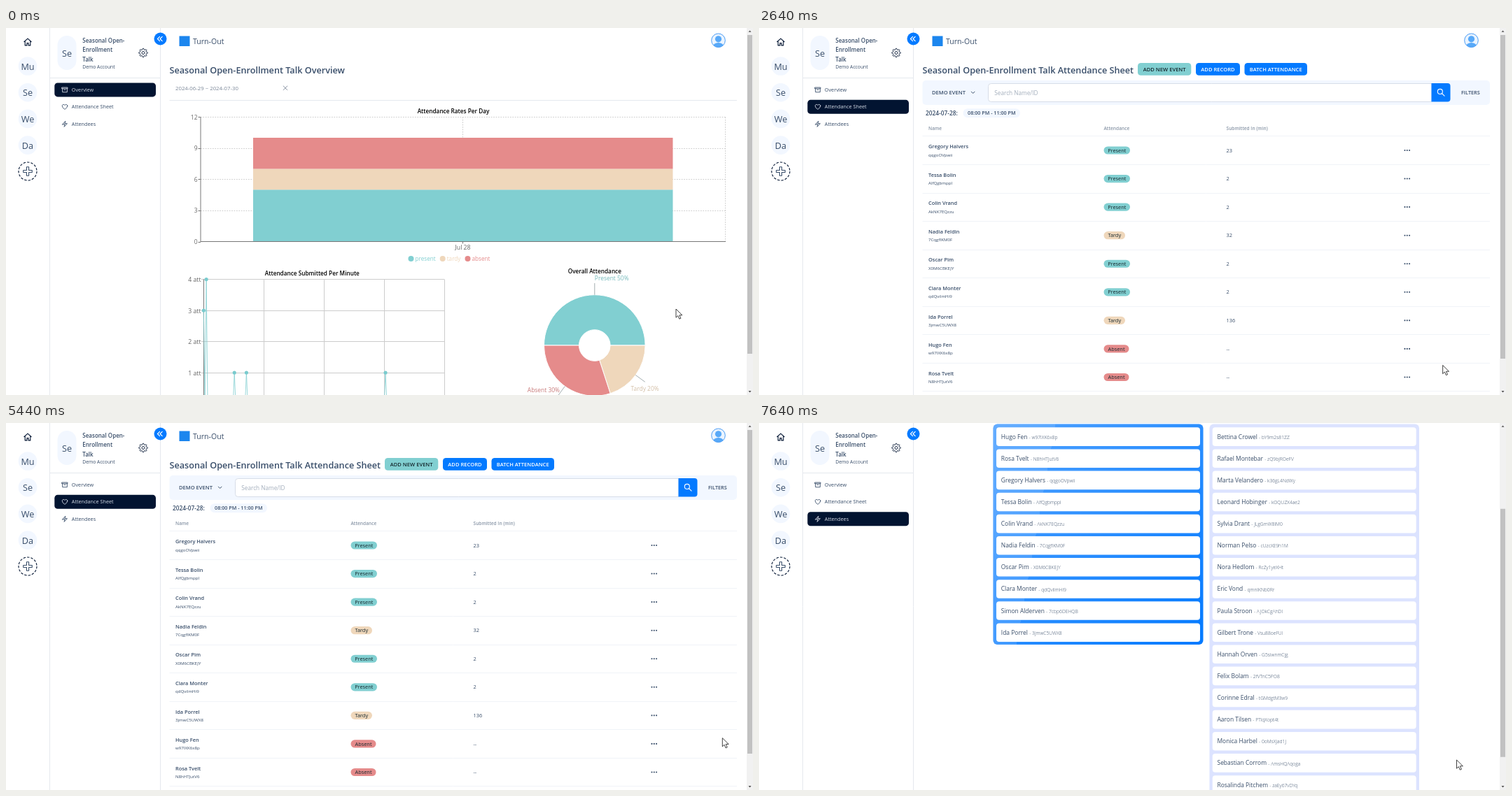
Animation, 1067 px wide and 525 px high, one loop 8 s. Source, as an HTML page with a canvas:

```html
<!DOCTYPE html>
<html lang="en">
<head>
<meta charset="utf-8">
<title>Attendance dashboard</title>
<style>
html, body { margin: 0; width: 100%; height: 100%; overflow: hidden; background: #fff; }
canvas { display: block; }
</style>
</head>
<body>
<canvas id="stage" width="1067" height="525"></canvas>
<script>
const ctx = document.getElementById('stage').getContext('2d');
const LOOP = 8000;
const BLUE = '#047aff', TEAL = '#81cfd1', SAND = '#efd7bb', RED = '#e58b8b';
const INK = '#394e6a', NAVY = '#021431', PALE = '#f2f7ff', LINE = '#e5e8ee', DARK = '#16282e';
const TITLE = 'Seasonal Open-Enrollment Talk';

const inside = [
  'Hugo Fen/w97IXK6x8p', 'Rosa Tvelt/N8hHTJutV6', 'Gregory Halvers/qqgoOVpwii',
  'Tessa Bolin/AlfQgbmppl', 'Colin Vrand/AkNK7EQzzu', 'Nadia Feldin/7CqgfIKM0F',
  'Oscar Pim/X0M6CBKEJY', 'Clara Monter/qdQvilmHi9', 'Simon Alderven/7cbp6DEHQB',
  'Ida Porrel/3jmwC5UWX8'].map(s => s.split('/'));
const outside = [
  'Bettina Crowel/bY9m2s81ZZ', 'Rafael Montebar/zQ9bjROeFV', 'Marta Velandero/k36gL4NdWy',
  'Leonard Hobinger/kOQUZX4ae2', 'Sylvia Drant/JLgGmW8lM0', 'Norman Pelso/cUzcXE9h1M',
  'Nora Hedlom/RcZy1yeXHt', 'Eric Vond/qmnIKNb0Rr', 'Paula Stroon/AJOkCgAhDl',
  'Gilbert Trone/Vsu88oeFUl', 'Hannah Orven/G5siwnmCjg', 'Felix Bolam/2fVTnC5PO8',
  'Corinne Edral/tGMdgtM3w9', 'Aaron Tilsen/PTlqXopt4t', 'Monica Harbel/0oMsXJad1J',
  'Sebastian Corrom/AmsHQAqoga', 'Rosalinda Pitchem/zaEy67vDYq'].map(s => s.split('/'));
// index into inside, status, minutes
const records = [[2, 'P', 23], [3, 'P', 2], [4, 'P', 2], [5, 'T', 32], [6, 'P', 2],
  [7, 'P', 2], [9, 'T', 136], [0, 'A', '--'], [1, 'A', '--'], [8, 'A', '--']];
const badges = { P: ['Present', 37.5, TEAL], T: ['Tardy', 30.5, SAND], A: ['Absent', 36, RED] };

const ICON = {
  home: 'M2.5 11.5L12 3l9.5 8.5M5 9.5V21h5v-6h4v6h5V9.5',
  box: 'M4 8v12h16V8M2.5 4h19v4h-19zM10 12h4',
  heart: 'M21 8.2c0-2.5-2.1-4.5-4.7-4.5-1.9 0-3.6 1.1-4.3 2.7-.7-1.6-2.4-2.7-4.3-2.7C5.1 3.7 3 5.7 3 8.2c0 7.3 9 12 9 12s9-4.7 9-12z',
  bolt: 'M3.8 13.5L14.2 2.2 12 10.5h8.2L9.8 21.8 12 13.5z',
  plus: 'M9.5 2h5v7.5H22v5h-7.5V22h-5v-7.5H2v-5h7.5z',
  search: 'M16 10a6.5 6.5 0 1 1-13 0a6.5 6.5 0 1 1 13 0M14.5 15L21 21.5',
  back: 'M11 4l-8 8 8 8M20 4l-8 8 8 8',
  down: 'M4 8l8 8 8-8',
  close: 'M4 4l16 16M20 4L4 20'
};

// ---- time helpers ----
const clamp = v => Math.max(0, Math.min(1, v));
const smooth = p => p * p * (3 - 2 * p);
const fade = (t, a, b) => smooth(clamp((t - a) / (b - a)));
const STEP = 65;
const ramp = (t, a, b) => t < a ? 0 : smooth(clamp((t - a + STEP) / (b - a + STEP)));

// ---- drawing helpers ----
function text(s, x, y, size, color = INK, weight = 400, align = 'left') {
  const px = size * 0.528;
  ctx.font = `${weight} ${px}px "Open Sans", "Noto Sans", sans-serif`;
  ctx.fillStyle = color;
  ctx.textAlign = align;
  ctx.fillText(s, x, y + px * 0.36);
  return ctx.measureText(s).width;
}
function box(x, y, w, h, r, fill, stroke) {
  ctx.beginPath();
  ctx.roundRect(x, y, w, h, r);
  if (fill) { ctx.fillStyle = fill; ctx.fill(); }
  if (stroke) { ctx.strokeStyle = stroke; ctx.lineWidth = 1; ctx.stroke(); }
}
function disc(x, y, r, fill) {
  ctx.beginPath();
  ctx.arc(x, y, r, 0, 7);
  ctx.fillStyle = fill;
  ctx.fill();
}
function seg(points, color, width = 1, dash = []) {
  ctx.beginPath();
  points.forEach(([x, y]) => ctx.lineTo(x, y));
  ctx.strokeStyle = color;
  ctx.lineWidth = width;
  ctx.setLineDash(dash);
  ctx.stroke();
  ctx.setLineDash([]);
}
const hline = (x1, x2, y, color = LINE, dash) => seg([[x1, y], [x2, y]], color, 1, dash);
const vline = (x, y1, y2, color = LINE, dash) => seg([[x, y1], [x, y2]], color, 1, dash);
function icon(name, cx, cy, size, color, width = 1) {
  const k = size / 24;
  ctx.save();
  ctx.translate(cx - size / 2, cy - size / 2);
  ctx.scale(k, k);
  ctx.strokeStyle = color;
  ctx.lineWidth = width / k;
  ctx.lineJoin = ctx.lineCap = 'round';
  ctx.stroke(new Path2D(ICON[name]));
  ctx.restore();
}
function button(label, x, y, w, fill, color) {
  box(x, y, w, 17.8, 4.4, fill);
  text(label, x + w / 2, y + 8.8, 14.4, color, 600, 'center');
}
const mix = (a, b, p) => `rgb(${a.map((v, i) => Math.round(v + (b[i] - v) * p))})`;

// ---- fixed side panels ----
function gear(cx, cy) {
  ctx.beginPath();
  for (let i = 0; i < 64; i++) {
    const a = i / 64 * Math.PI * 2, r = 5.4 + 0.9 * Math.tanh(3 * Math.cos(8 * a));
    ctx.lineTo(cx + r * Math.cos(a), cy + r * Math.sin(a));
  }
  ctx.closePath();
  ctx.moveTo(cx + 2, cy);
  ctx.arc(cx, cy, 2, 0, 7);
  ctx.strokeStyle = NAVY;
  ctx.lineWidth = 0.9;
  ctx.stroke();
}
function sidebar(active) {
  box(0, 0, 220, 525, 0, '#fff');
  vline(62.5, 0, 525);
  vline(220.5, 0, 525);
  icon('home', 31, 20, 13, NAVY, 1.1);
  ['Mu', 'Se', 'We', 'Da'].forEach((s, i) => {
    const y = 54.5 + 37.7 * i;
    disc(31, y, 13.3, PALE);
    text(s, 31, y + 0.5, 24, INK, 400, 'center');
  });
  ctx.beginPath();
  ctx.arc(31, 205, 13, 0, 7);
  ctx.strokeStyle = NAVY;
  ctx.lineWidth = 1.1;
  ctx.setLineDash([3.4, 2.05]);
  ctx.stroke();
  ctx.setLineDash([]);
  icon('plus', 31, 205, 15, INK, 1.1);

  box(73.5, 11, 27, 49, 13.5, PALE);
  text('Se', 87, 36.5, 24, INK, 400, 'center');
  ['Seasonal Open-', 'Enrollment', 'Talk'].forEach((s, i) => text(s, 109.3, 18 + 13.4 * i, 15.2, INK, 600));
  text('Demo Account', 109.3, 56, 12.8);
  gear(196, 35.5);
  hline(63, 220, 71.5);

  [['Overview', 'box'], ['Attendance Sheet', 'heart'], ['Attendees', 'bolt']].forEach(([label, pic], i) => {
    const y = 88.4 + 24.45 * i, p = active[i];
    ctx.globalAlpha = p;
    box(69.3, y - 10, 144.7, 20, 4.4, NAVY);
    ctx.globalAlpha = 1;
    const color = mix([57, 78, 106], [214, 219, 230], p);
    icon(pic, 84, y, 10, color, 0.9);
    text(label, 93.8, y, 13.8, color);
  });
  disc(220.5, 15.5, 9, BLUE);
  icon('back', 220, 15.5, 9.5, '#fff', 1.2);
}

// ---- pages ----
function header(right) {
  box(247.5, 11.5, 15, 14.5, 0, '#1c86ee');
  text('Turn-Out', 267, 19, 20, INK, 500);
  const x = right - 26.5, y = 17.8;
  ctx.save();
  ctx.beginPath();
  ctx.arc(x, y, 9.8, 0, 7);
  ctx.fillStyle = '#eaf4ff';
  ctx.fill();
  ctx.clip();
  disc(x, y - 2, 4.6, '#58a9f8');
  ctx.beginPath();
  ctx.ellipse(x, y + 9.5, 8, 6.3, 0, 0, 7);
  ctx.fill();
  ctx.restore();
  ctx.beginPath();
  ctx.arc(x, y, 9.8, 0, 7);
  ctx.strokeStyle = '#4a9cf5';
  ctx.lineWidth = 1;
  ctx.stroke();
}

const chartTitle = (s, x, y) => text(s, x, y, 15.6, '#000', 600, 'center');

function ratesChart() {
  chartTitle('Attendance Rates Per Day', 639, 118.8);
  const yAt = v => 305.5 - v * 14.85;
  for (let v = 3; v <= 12; v += 3) hline(278, 1028, Math.round(yAt(v)) + 0.5, '#ccc', [1.7, 1.7]);
  vline(652.5, 127.5, 305, '#ccc', [1.7, 1.7]);
  vline(1027.5, 127.5, 305, '#ccc', [1.7, 1.7]);
  [[0, 5, TEAL], [5, 7, SAND], [7, 10, RED]].forEach(([a, b, c]) =>
    box(353, yAt(b), 599.5, yAt(a) - yAt(b), 0, c));
  vline(278, 127.5, 306, '#777');
  hline(278, 1028, 305.5, '#777');
  for (let v = 0; v <= 12; v += 3) {
    hline(274.5, 278, Math.round(yAt(v)) + 0.5, '#777');
    text(v, 273.5, yAt(v) + 0.5, 16, '#666', 400, 'right');
  }
  vline(652.5, 306, 308.5, '#777');
  text('Jul 28', 652.5, 313.6, 16.5, '#666', 400, 'center');
  [['present', 578.5, TEAL], ['tardy', 623.7, SAND], ['absent', 659.5, RED]].forEach(([s, x, c]) => {
    disc(x, 330, 4, c);
    text(s, x + 6, 329.8, 15.5, c);
  });
}

function minuteChart() {
  chartTitle('Attendance Submitted Per Minute', 437.3, 351);
  const xAt = m => 282.3 + m * 1.91, yAt = v => 537.5 - v * 44.5;
  for (let i = 1; i <= 4; i++) {
    vline(Math.round(282 + 86 * i) + 0.5, 359.5, 525, '#ccc');
    hline(279, 626, Math.round(yAt(i) - 0.5) + 0.5, '#ccc');
    text(i + ' att', 278.5, yAt(i) + 0.5, 16.5, '#666', 400, 'right');
  }
  vline(282.5, 359.5, 525, '#777');
  const peaks = [[0, 3], [2, 4], [23, 1], [32, 1], [136, 1]];
  seg(peaks.flatMap(([m, v]) => [[xAt(m - 1), yAt(0)], [xAt(m), yAt(v)], [xAt(m + 1), yAt(0)]]).slice(1), TEAL, 0.8);
  peaks.forEach(([m, v]) => disc(xAt(m), yAt(v), 2.6, '#79cbce'));
}

function pieChart() {
  const x = 840.8, y = 454, R = 72.3, rad = Math.PI / 180;
  chartTitle('Overall Attendance', x, 348);
  [[180, 360, TEAL], [0, 72, SAND], [72, 180, RED]].forEach(([a, b, c]) => {
    ctx.beginPath();
    ctx.arc(x, y, R, a * rad, b * rad);
    ctx.arc(x, y, 22.3, b * rad, a * rad, true);
    ctx.closePath();
    ctx.fillStyle = c;
    ctx.fill();
    ctx.strokeStyle = '#fff';
    ctx.lineWidth = 1;
    ctx.stroke();
    const mid = (a + b) / 2 * rad;
    seg([R, 89].map(r => [x + r * Math.cos(mid), y + r * Math.sin(mid)]), '#8c9a9c', 0.8);
  });
  text('Present 50%', 840.8, 357.5, 16, '#74b9bb');
  text('Tardy 20%', 892.5, 515.5, 16, '#d3bfa7');
  text('Absent 30%', 791, 518, 16, '#c87b7b', 400, 'right');
}

function overview() {
  header(1044);
  text(TITLE + ' Overview', 233.5, 60, 24, INK, 600);
  text('2024-06-29 ~ 2024-07-30', 242, 85.8, 14.8, '#7b8798');
  icon('close', 399, 85.8, 8.5, '#7b8798', 0.9);
  hline(233.5, 1044, 103.5);
  ratesChart();
  minuteChart();
  pieChart();
}

function searchBar(label, x, right) {
  box(233.5, 75, right - 233.5, 35, 5, PALE);
  text(label, 247, 92.3, 14.3, INK, 600);
  const end = right - 56.5;
  box(x + 0.5, 79.5, end - 27 - x, 26, [4, 0, 0, 4], '#fff', '#d7dde8');
  box(end - 27, 79, 27, 26.5, [0, 4, 4, 0], BLUE);
  icon('search', end - 13.3, 92, 13, '#fff', 1.1);
  text('Search Name/ID', x + 9.3, 93, 15.6, '#a3aebc');
  text('FILTERS', right - 41, 92.3, 13.8, INK, 600);
}

function sheetTitle() {
  text(TITLE + ' Attendance Sheet', 233.5, 60, 24, INK, 600);
  button('ADD NEW EVENT', 541, 50, 76.3, TEAL, DARK);
}

function loading(t) {
  header(1053.5);
  sheetTitle();
  searchBar('NO ATTENDANCE', 326, 1053.5);
  for (let i = 0; i < 3; i++)
    disc(639.5 + 4.2 * i, 282 + 1.3 * Math.cos((t - 1600) / 1050 * Math.PI * 2 + 0.2 + i * 1.05), 1.6, INK);
}

function sheet() {
  header(1044);
  sheetTitle();
  button('ADD RECORD', 624, 50, 63, BLUE, '#fff');
  button('BATCH ATTENDANCE', 693.5, 50, 89.5, BLUE, '#fff');
  searchBar('DEMO EVENT', 327, 1044);
  icon('down', 305.7, 92.3, 7, INK, 1);
  text('2024-07-28:', 238, 121.7, 15.8, INK, 600);
  box(291.5, 115.2, 81.5, 13, 6.5, PALE);
  text('08:00 PM - 11:00 PM', 332.3, 121.8, 13.6, INK, 600, 'center');
  [['Name', 242], ['Attendance', 492.5], ['Submitted In (min)', 667.5]].forEach(([s, x]) =>
    text(s, x, 143.7, 12.5, '#8895a6', 600));
  hline(233.5, 1044, 154.5, '#f0f3f8');
  records.forEach(([who, status, min], i) => {
    const y = 175 + 40.56 * i, [name, id] = inside[who], [label, w, color] = badges[status];
    text(name, 242, y - 5.5, 14, INK, 600);
    text(id, 242, y + 6.3, 11.6);
    box(492.5, y - 5.6, w, 11.2, 5.6, color);
    text(label, 492.5 + w / 2, y, 14, DARK, 400, 'center');
    text(min, 667.5, y, 14);
    for (let k = -1; k <= 1; k++) disc(925.8 + 3.3 * k, y, 1.05, INK);
    if (i < 9) hline(233.5, 1044, Math.round(y + 20) + 0.5, '#f0f3f8');
  });
}

function glass(x, y, w, h) {
  const cx = x + w / 2, cy = y + h / 2, d = (w + h) / 4;
  box(x, y, w, h, 6, BLUE);
  const sheen = ctx.createLinearGradient(cx - d, cy - d, cx + d, cy + d);
  sheen.addColorStop(0, 'rgba(255,255,255,.3)');
  sheen.addColorStop(1, 'rgba(255,255,255,0)');
  box(x, y, w, h, 6, sheen);
  const dx = Math.cos(Math.PI / 18), dy = Math.sin(Math.PI / 18), half = (w * dx + h * dy) / 2;
  const band = ctx.createLinearGradient(cx - dx * half, cy - dy * half, cx + dx * half, cy + dy * half);
  band.addColorStop(0.25, 'rgba(255,255,255,.12)');
  band.addColorStop(0.25, 'rgba(255,255,255,0)');
  box(x, y, w, h, 6, band);
}
function cards(list, x) {
  list.forEach(([name, id], i) => {
    const y = 186.3 + 31.12 * i;
    box(x, y - 13.3, 291, 26.6, 4, '#fff');
    const w = text(name, x + 6.8, y, 16, INK, 400);
    text('- ' + id, x + 9 + w, y + 0.7, 12.8, INK, 300);
  });
}
function attendees() {
  header(1044);
  button('ADD ALL', 334.5, 63.3, 46.5, BLUE, '#fff');
  button('REMOVE ALL', 389.5, 63.3, 60.3, SAND, DARK);
  button('SAVE', 458.3, 63.3, 33, TEAL, DARK);
  text('Click on an attendee to move them from one side to the other.', 334.7, 91.5, 14);
  box(335, 106, 608, 26, 4, '#fff', '#d7dde8');
  text('Search By Name/ID', 344, 119.8, 15.6, '#a3aebc');
  text('Inside Meet', 334.7, 150, 30, INK, 600);
  text('Outside Meet', 943, 150, 30, INK, 600, 'right');
  hline(334.5, 634.5, 163.5);
  hline(643.5, 943, 163.5);
  glass(334.5, 168.3, 300, 315.5);
  box(643.5, 168.3, 299.5, 560, 6, '#dce3ff');
  cards(inside, 339);
  cards(outside, 647.7);
}

function scrollbar(length, scroll) {
  box(1058, 0, 9, 525, 0, '#f1f1f1');
  box(1059, 10 + scroll * length / 525, 7, length, 0, '#c1c1c1');
  [[4.8, -1], [520, 1]].forEach(([y, d]) => {
    ctx.beginPath();
    ctx.moveTo(1060.5, y - d);
    ctx.lineTo(1064.5, y - d);
    ctx.lineTo(1062.5, y + d * 1.4);
    ctx.fillStyle = '#505050';
    ctx.fill();
  });
}

function status() {
  box(0, 513.5, 120, 12, [0, 2, 0, 0], '#202124');
  text('localhost:3000/dashboard/3/attendees', 2.7, 519.5, 11.8, '#dfe1e5');
}

// ---- pointer ----
const moves = [ // start, end, x, y
  [500, 570, 981, 390], [570, 900, 121, 112], [1100, 1620, 964, 475], [1700, 1900, 963, 478],
  [2640, 2840, 1051, 506.5], [4370, 4770, 1045, 500], [5300, 5900, 950, 284],
  [6040, 6170, 968, 310], [6235, 6700, 983, 482], [7100, 7240, 996.5, 482]];
const ARROW = new Path2D('M0 0V12.2L2.8 9.6 4.8 14.2 6.9 13.3 4.9 8.8H8.9Z');
const HAND = new Path2D('M-1.4 1.2C-1.4-.4 1.2-.4 1.2 1.2V6C1.4 4.8 3.8 4.8 3.9 6.2 4.3 5.2 6.4 5.4 6.5 6.8 7 6 9 6.4 9 8V11.5C9 13 7.6 14.4 7.6 16.5H.2C.2 14.5-2.4 12.6-4.2 9.6-5 8-3.2 7.2-2.2 8.6L-1.4 9.6Z');
function pointer(t) {
  let x = 957, y = 402;
  for (const [a, b, tx, ty] of moves) {
    const p = ramp(t, a, b);
    x += (tx - x) * p;
    y += (ty - y) * p;
  }
  const hand = t >= 880 && t < 1230 || t >= 5780 && t < 6320;
  const shape = hand ? HAND : ARROW;
  ctx.save();
  ctx.translate(x, y);
  ctx.fillStyle = '#fff';
  ctx.fill(shape);
  ctx.strokeStyle = '#111';
  ctx.lineWidth = 0.8;
  ctx.lineJoin = 'miter';
  ctx.stroke(shape);
  if (hand) [1.2, 3.9, 6.5].forEach(k => vline(k, 6, 9, '#111'));
  ctx.restore();
}

// ---- timeline ----
function render(t) {
  ctx.fillStyle = '#fff';
  ctx.fillRect(0, 0, 1067, 525);
  const scroll = t < 6360
    ? 48.3 * (ramp(t, 3040, 3300) - ramp(t, 3900, 4040))
    : 166.7 * ramp(t, 7440, 7640);
  const [page, thumb] = t < 1555 ? [overview, 456] : t < 1880 ? [loading, 0]
    : t < 6360 ? [sheet, 463] : [attendees, 355];
  ctx.save();
  ctx.translate(0, -scroll);
  page(t);
  ctx.restore();
  if (thumb) scrollbar(thumb, scroll);
  const toSheet = fade(t, 1555, 1705);
  sidebar([1 - toSheet, toSheet - fade(t, 6360, 6510), fade(t, 6075, 6350)]);
  if (t >= 1165 && t < 1840 || t >= 5760 && t < 6500) status();
  pointer(t);
}

const began = performance.now();
function tick() {
  render((performance.now() - began) % LOOP);
  requestAnimationFrame(tick);
}
tick();
</script>
</body>
</html>
```
